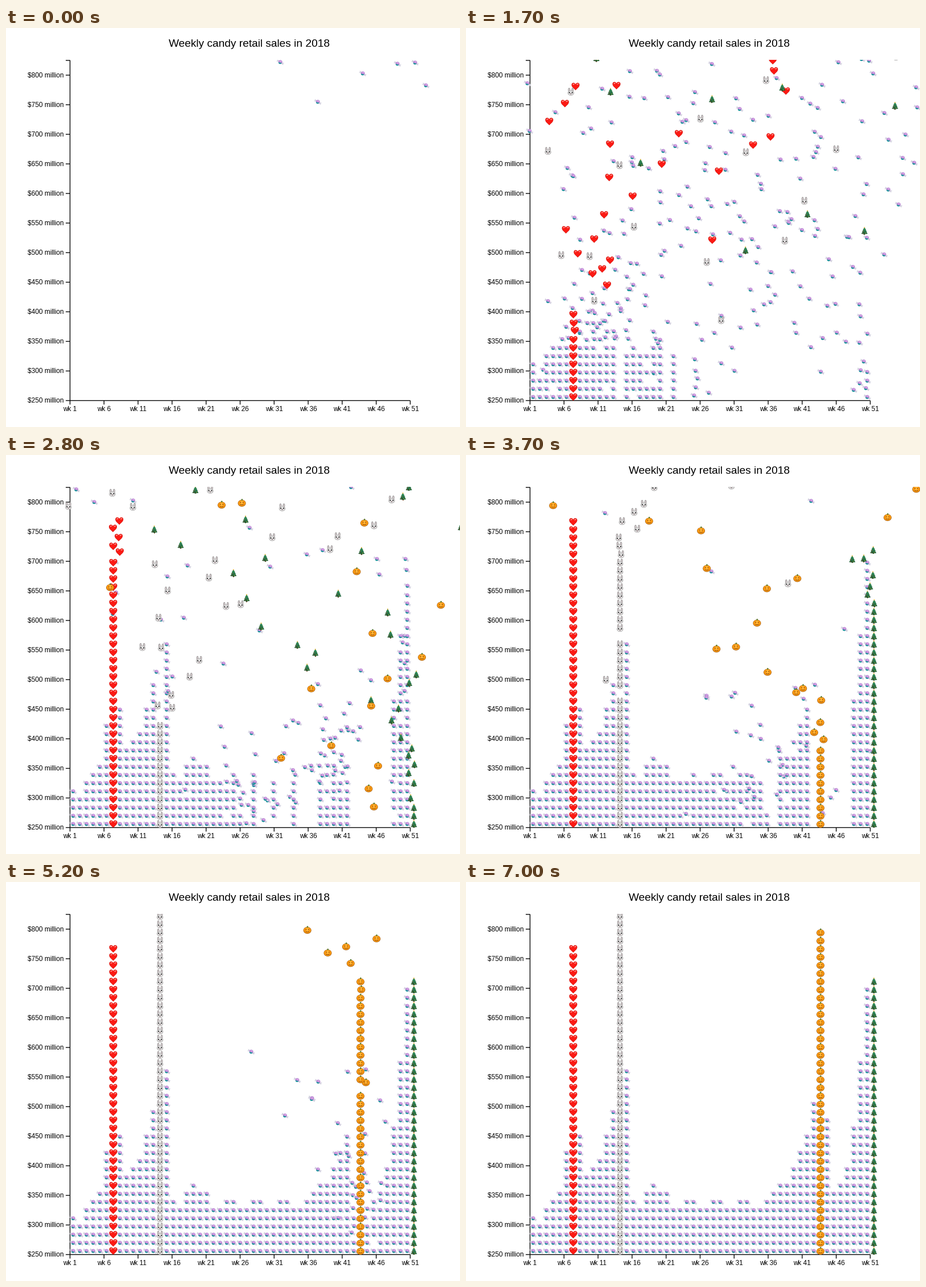
Recreate the animation shown at these times as a matplotlib script. Size 798 by 702 pixels, loop 7.1 s.

```python
import numpy as np
import matplotlib.pyplot as plt
from matplotlib.animation import FuncAnimation
from matplotlib.collections import PathCollection
from matplotlib.patches import Rectangle
from matplotlib.path import Path
from matplotlib.transforms import Affine2D

W, H, DPI = 798, 702, 100
FRAMES, STEP = 71, 100
PX = 72 / DPI                       # points per pixel
LEFT, RIGHT, TOP, BOTTOM = 112.5, 710.5, 57, 655.5
FONT = "Liberation Sans"

# Holiday columns: week -> icon, number of icons, launch time, ms between icons
HOLIDAYS = {
    7: ("heart", 38, 0, 42),
    14: ("rabbit", 42, 900, 44),
    44: ("pumpkin", 40, 1700, 65),
    52: ("tree", 34, 1150, 46),
}

# Turning points of the candy sales: week -> icons in the column
SALES = {1: 5, 2: 4, 3: 6, 5: 8, 6: 13, 8: 15, 9: 10, 11: 12, 13: 18, 15: 23,
         16: 7, 17: 6, 19: 9, 21: 8, 22: 6, 35: 6, 38: 9, 39: 9, 42: 15,
         43: 19, 45: 17, 46: 8, 48: 10.6, 49: 16, 51: 33}

# Turning points of the candy launches: week -> ms
LAUNCH = {20: 0, 21: 1000, 35: 2000, 37: 2700, 38: 1200, 42: 1200,
          43: 3700, 47: 3500, 48: 2500, 49: 700, 51: 200}

# Candies already in view when the loop begins
EARLY = [(482, 60), (548, 130), (627, 80), (688, 63), (719, 61), (738, 101)]


def between(points, week):
    return np.interp(week, list(points), list(points.values()))


def column(week):
    """Icon, number of icons, launch time and pace of one week."""
    if week in HOLIDAYS:
        return HOLIDAYS[week]
    count, launch = between(SALES, week), between(LAUNCH, week)
    if 22 <= week <= 35:            # quiet months: small ripple, mixed launches
        count += week % 4 < 2
        launch -= 1000 * (week % 3 == 1)
    return "candy", round(count), max(launch, 0), 44


def plan_flights():
    """Rows of x0, y0, x1, y1, start, duration for each kind of icon."""
    rng = np.random.default_rng(18)
    early = iter(EARLY)
    flights = {kind: [] for kind in ICONS}
    for week in range(1, 53):
        kind, count, launch, pace = column(week)
        for row in range(count):
            start = launch + pace * row + rng.exponential(50)
            if rng.random() < 0.06:
                start += rng.uniform(0, 1400)
            x0, y0 = rng.uniform(100, 820), rng.uniform(0, 48)
            if row == 0 and kind == "candy":
                spot = next(early, None)
                if spot:
                    (x0, y0), start = spot, 0
            flights[kind].append((x0, y0, 118 + 11.745 * (week - 1),
                                  649.3 - 14.37 * row, min(start, 5350),
                                  rng.uniform(1300, 1480)))
    return {kind: np.array(rows) for kind, rows in flights.items()}


def positions(flight, t):
    x0, y0, x1, y1, start, duration = flight.T
    p = np.clip((t - start) / duration, 0, 1)
    across = p * p * (3 - 2 * p)
    down = 1 - (1 - p) ** 2
    return np.column_stack([x0 + (x1 - x0) * across, y0 + (y1 - y0) * down])


def oval(cx, cy, rx, ry, angle=0):
    spin = Affine2D().scale(rx, ry).rotate_deg(angle).translate(cx, cy)
    return Path.unit_circle().transformed(spin)


def polygon(*points):
    return Path(list(points) + [points[0]], closed=True)


def heart(size):
    verts = [(0, 6.6), (-2, 4), (-7, 1.4), (-7, -2.8),
             (-7, -7.6), (-1, -7.6), (0, -3.6),
             (1, -7.6), (7, -7.6), (7, -2.8),
             (7, 1.4), (2, 4), (0, 6.6)]
    return Path(np.array(verts) * size, [Path.MOVETO] + [Path.CURVE4] * 12)


def pair(x, *rest):
    """The same oval left and right of the middle."""
    return [oval(side * x, *rest) for side in (-1, 1)]


def paint(color, *shapes):
    return [(shape, color) for shape in shapes]


def fir(top, bottom, half):
    return polygon((0, top), (-half, bottom), (0, bottom + 0.9), (half, bottom))


ICONS = {
    "candy":
        paint("#d3d1e0",
              polygon((-2, -0.6), (-6.8, -1.2), (-5.2, -2.6), (-5.2, -5), (-1.6, -2.6)),
              polygon((2, 0.6), (7, 1.6), (5.4, 2.8), (5.4, 5.2), (1.4, 2.8)))
        + paint("#bd8ad6", oval(0.2, -0.3, 3.5, 3.3))
        + paint("#17969a", polygon((-3.3, 0), (-0.6, 1), (2.6, 1.5), (1.4, 3),
                                   (-0.6, 3.4), (-2.5, 2.5)))
        + paint("#deb2ea", oval(0.8, -1.5, 1.6, 0.9)),
    "heart":
        paint("#cf130e", heart(1)) + paint("#fb1a14", heart(0.9))
        + paint("#ff9d94", *pair(3.5, -4, 1.8, 0.9, -25)),
    "rabbit":
        paint("#9b9999", *pair(3, -3.4, 1.9, 3.6))
        + paint("#ded2d5", *pair(3, -3.2, 0.9, 2.6))
        + paint("#a3a1a1", oval(0, 2, 5.6, 4.6))
        + paint("#e6e5e5", oval(0, 2, 4.8, 3.8))
        + paint("#2b2b2b", *pair(2.5, 1.4, 1.1, 1.2))
        + paint("#806a6e", oval(0, 3.6, 1.2, 0.9)),
    "tree":
        paint("#7a4a26", polygon((-1, 4), (1, 4), (1, 6.8), (-1, 6.8)))
        + paint("#1c6238", fir(-3, 5, 5.6))
        + paint("#28774a", fir(-5, 1.6, 4.4))
        + paint("#2f8553", fir(-6.4, -1.6, 3))
        + paint("#e0b63a", oval(0, -5.9, 1, 1), oval(1.8, 3.6, 0.7, 0.7))
        + paint("#c4503f", oval(-2, 0.6, 0.7, 0.7), oval(-2.8, 4, 0.7, 0.7)),
    "pumpkin":
        paint("#ad620f", oval(0, 0.5, 7, 6))
        + paint("#ff9d12", oval(0, 0.3, 6.2, 5.2))
        + paint("#ffb133", oval(0, -0.4, 2.4, 4.2))
        + paint("#5d7a2b", polygon((-1.2, -4.4), (-0.6, -7.2), (1.6, -6.8), (1.2, -4.4)))
        + paint("#8f4a08", *pair(2.4, -0.9, 0.9, 0.9),
                polygon((-4, 1.8), (0, 2.9), (4, 1.8), (2, 3.7), (-2, 3.7))),
}

fig = plt.figure(figsize=(W / DPI, H / DPI), dpi=DPI, facecolor="white")
ax = fig.add_axes([0, 0, 1, 1])
ax.set(xlim=(0, W), ylim=(H, 0))
ax.axis("off")


def line(xs, ys):
    ax.plot(xs, ys, color="black", lw=1.35 * PX, solid_capstyle="butt",
            solid_joinstyle="miter", snap=False, zorder=1)


def label(x, y, text, size, align):
    ax.text(x, y, text, fontsize=size * PX, family=FONT, ha=align,
            va="baseline", color="black")


def draw_axes():
    label(427.5, 33, "Weekly candy retail sales in 2018", 19.1, "center")
    line([105, LEFT, LEFT], [TOP, TOP, BOTTOM])
    line([LEFT, RIGHT], [BOTTOM, BOTTOM])
    for k in range(12):
        y = BOTTOM - 52.05 * k
        line([105, LEFT], [y, y])
        label(101.3, y + 4, f"${250 + 50 * k} million", 11.9, "right")
    for k in range(11):
        x = LEFT + 59.8 * k
        line([x, x], [BOTTOM, 662.5])
        label(x, 674, f"wk {1 + 5 * k}", 11.7, "center")


def icon_layer(kind, order):
    shapes, colors = zip(*ICONS[kind])
    flip = Affine2D().scale(1 / DPI, -1 / DPI) + fig.dpi_scale_trans
    layer = PathCollection(shapes, facecolors=colors, edgecolors="none",
                           offsets=[(0, 0)], offset_transform=ax.transData,
                           transform=flip, zorder=order)
    ax.add_collection(layer, autolim=False)
    layer.set_clip_path(Rectangle((0, TOP - 1), W, H, transform=ax.transData))
    return layer


draw_axes()
FLIGHTS = plan_flights()
LAYERS = {kind: icon_layer(kind, 3 + i) for i, kind in enumerate(ICONS)}


def update(frame):
    # the picture rests for one step in every second
    t = STEP * (frame - (frame % 10 == 3))
    for kind, layer in LAYERS.items():
        spots = positions(FLIGHTS[kind], t)
        layer.set_offsets(np.repeat(spots, len(ICONS[kind]), axis=0))
    return list(LAYERS.values())


anim = FuncAnimation(fig, update, frames=FRAMES, interval=STEP, repeat=True,
                     repeat_delay=0, blit=False)
plt.show()
```
